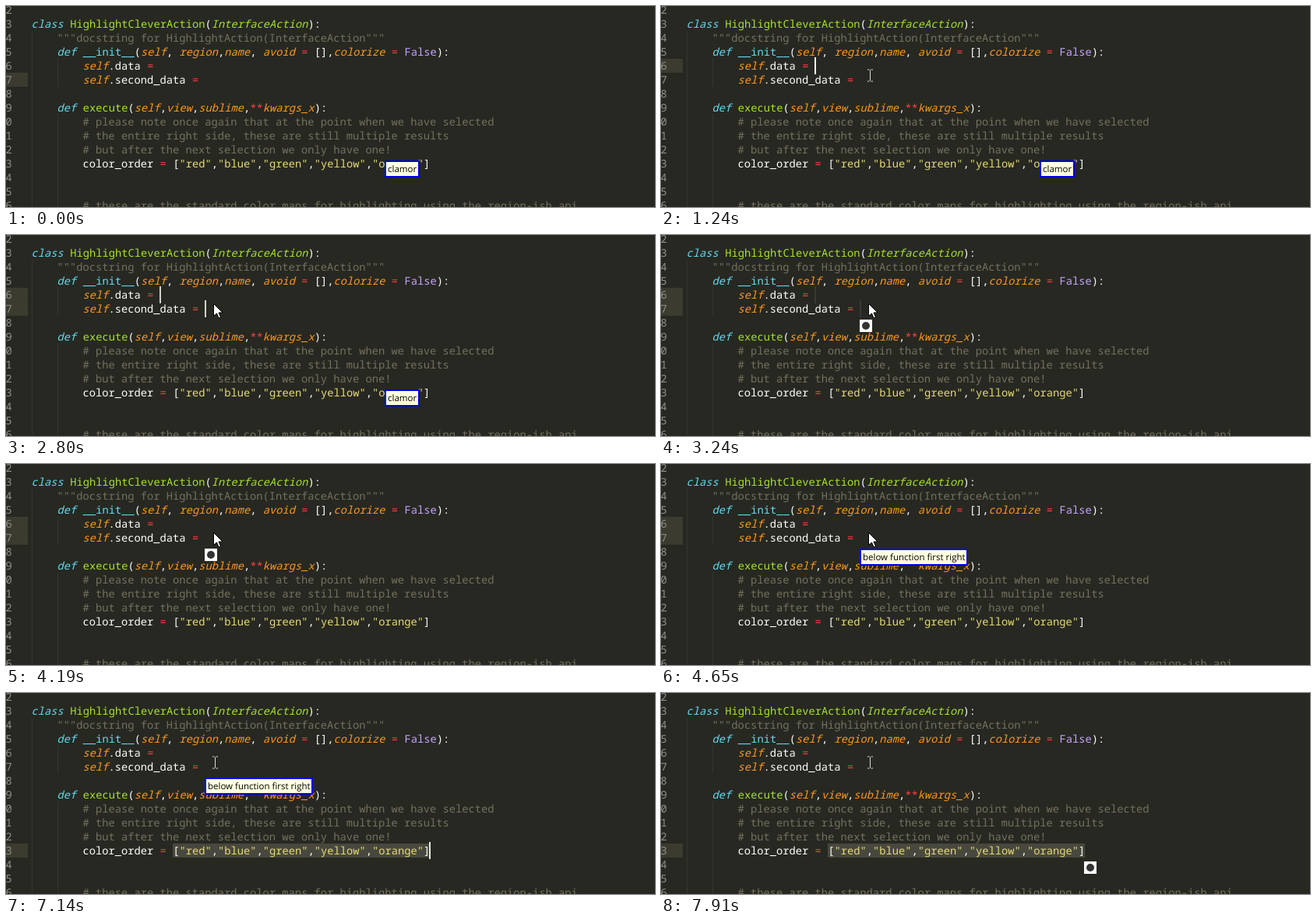
These frames come from a looping animation (833 px wide and 259 px high, 8 s). An HTML page:

```html
<!DOCTYPE html>
<html lang="en">
<head>
<meta charset="utf-8">
<title>Editor with multiple carets</title>
<style>
  html, body { margin: 0; width: 100%; height: 100%; overflow: hidden; background: #272822; }
  svg { display: block; }
  text { fill: #fff; text-rendering: geometricPrecision; }
  #code text, #nums text { font: 500 13.75px "Noto Sans Mono", "DejaVu Sans Mono", monospace; }
  #nums text { fill: #8f908a; }
  #code .k { fill: #66d9ef; }
  #code .n { fill: #a6e22e; }
  #code .a { fill: #fd971f; }
  #code .o { fill: #ff4040; }
  #code .v { fill: #c5a5ff; }
  #code .s { fill: #e6db74; }
  #code .c { fill: #75715e; font-weight: 400; }
  #code .i { font-style: italic; }
  #gutter { fill: #3c3b2f; }
  #guides { stroke: #42433b; stroke-dasharray: 1 1; }
  #carets { fill: #f8f8f0; }
  #tip text { fill: #000; font: 11.5px "Open Sans", "Noto Sans", sans-serif; }
</style>
</head>
<body>
<svg width="833" height="259" viewBox="0 0 833 259">
  <g id="gutter"></g>
  <path id="guides" d="M33.5 33V259M66.5 68V104M66.5 140V259"/>
  <rect id="selection" x="214" y="194" width="330" height="18" fill="#49483e"/>
  <g id="nums"></g>
  <g id="code" transform="translate(-0.4 0)">
    <text x="33" y="28"><tspan class="k i">class</tspan> <tspan class="n">HighlightCleverAction</tspan>(<tspan class="n i">InterfaceAction</tspan>):</text>
    <text x="66" y="46" class="c">"""docstring for HighlightAction(InterfaceAction"""</text>
    <text x="66" y="64"><tspan class="k i">def</tspan> <tspan class="k">__init__</tspan>(<tspan class="a i">self</tspan>, <tspan class="a i">region</tspan>,<tspan class="a i">name</tspan>, <tspan class="a i">avoid</tspan> <tspan class="o">=</tspan> [],<tspan class="a i">colorize</tspan> <tspan class="o">=</tspan> <tspan class="v">False</tspan>):</text>
    <text x="99" y="82"><tspan class="a i">self</tspan>.data <tspan class="o">=</tspan></text>
    <text x="99" y="100"><tspan class="a i">self</tspan>.second_data <tspan class="o">=</tspan></text>
    <text x="66" y="136"><tspan class="k i">def</tspan> <tspan class="n">execute</tspan>(<tspan class="a i">self</tspan>,<tspan class="a i">view</tspan>,<tspan class="a i">sublime</tspan>,<tspan class="o">**</tspan><tspan class="a i">kwargs_x</tspan>):</text>
    <text x="99" y="154" class="c"># please note once again that at the point when we have selected</text>
    <text x="99" y="172" class="c"># the entire right side, these are still multiple results</text>
    <text x="99" y="190" class="c"># but after the next selection we only have one!</text>
    <text x="99" y="208">color_order <tspan class="o">=</tspan> [<tspan class="s">"red"</tspan>,<tspan class="s">"blue"</tspan>,<tspan class="s">"green"</tspan>,<tspan class="s">"yellow"</tspan>,<tspan class="s">"orange"</tspan>]</text>
    <text x="99" y="262" class="c"># these are the standard color maps for highlighting using the region-ish api</text>
  </g>
  <g id="carets"></g>
  <g id="tip">
    <rect x="1" y="1" height="20" fill="#ffffe1" stroke="#0000e6" stroke-width="2"/>
    <text x="4" y="15"></text>
  </g>
  <g id="icon">
    <rect width="16" height="16" fill="#fff"/>
    <circle cx="8" cy="8" r="5" fill="#333"/>
  </g>
  <path id="beam" d="M-3.5 -7.5H-1M1 -7.5H3.5M0 -7V7M-3.5 7.5H-1M1 7.5H3.5" fill="none" stroke="#dddddf"/>
  <path id="arrow" transform="translate(266.5 88.5)" d="M0 0V16L4 12.5L6.5 18.5L9 17.5L6.5 11.5H11.5Z" fill="#fff" stroke="#000"/>
</svg>
<script>
const LOOP = 8000, CLICK = 850, ADD = 1480, SELECT = 4800;
const $ = id => document.getElementById(id);
const show = (el, on) => el.setAttribute("visibility", on ? "visible" : "hidden");
const place = (el, x, y) => el.setAttribute("transform", `translate(${x} ${y})`);
const clamp = v => Math.max(0, Math.min(1, v));
const rowTop = line => 14 + (line - 3) * 18;

function add(parent, tag, attrs) {
  const el = document.createElementNS("http://www.w3.org/2000/svg", tag);
  for (const key in attrs) el.setAttribute(key, attrs[key]);
  return parent.appendChild(el);
}

for (let line = 2; line <= 16; line++)
  add($("nums"), "text", { x: -0.5, y: rowTop(line) + 14 }).textContent = line % 10;

// One gutter mark and one caret for each line that gets edited
const spots = [[6, 197], [7, 255], [13, 543]].map(([line, x]) => ({
  line,
  mark: add($("gutter"), "rect", { x: 0, y: rowTop(line), width: 28, height: 18 }),
  caret: add($("carets"), "rect", { x, y: rowTop(line) - 2, width: 2, height: 22 })
}));

const blinks = [[CLICK, 2320], [2720, 3240], [3560, 4160], [SELECT, 5430], [5980, 6520], [7050, 7600]];

function caretAlpha(t) {
  if (t >= 3240 && t < 3560) return 0.08;
  const blink = blinks.find(([on, off]) => t >= on && t < off);
  return blink ? Math.min(clamp((t - blink[0]) / 100), clamp((blink[1] - t) / 230)) : 0;
}

function activeLines(t) {
  return t < CLICK ? [7] : t < ADD ? [6] : t < SELECT ? [6, 7] : [13];
}

const phrase = "below function first right";
const popups = [ // start, x, y, width, text (no text: icon)
  [0, 486, 199, 45, "clamor"],
  [2870, 255, 109],
  [4650, 255, 109, 139, phrase],
  [7220, 543, 217, 139, phrase],
  [7450, 543, 217]
];

function drawPopup(t) {
  const [, x, y, width, text] = popups.filter(p => p[0] <= t).pop();
  const tip = $("tip");
  show(tip, text);
  show($("icon"), !text);
  place(text ? tip : $("icon"), x, y);
  if (text) {
    tip.children[0].setAttribute("width", width - 2);
    tip.children[1].textContent = text;
  }
}

function drawPointer(t) {
  const ease = v => v * v * (3 - 2 * v);
  const a = ease(clamp((t - 70) / 630)), b = ease(clamp((t - CLICK) / 230));
  const arrow = t >= ADD && t < SELECT;
  show($("arrow"), arrow);
  show($("beam"), t >= 70 && !arrow);
  place($("beam"), Math.round(571 - 309 * a + 6 * b) + 0.5, Math.round(203 - 125 * a + 11 * b) + 0.5);
}

function draw(now) {
  const t = now % LOOP, lines = activeLines(t), alpha = caretAlpha(t);
  for (const { line, mark, caret } of spots) {
    const active = lines.includes(line);
    show(mark, active);
    caret.setAttribute("opacity", active ? alpha : 0);
  }
  show($("selection"), t >= SELECT);
  drawPopup(t);
  drawPointer(t);
}

const start = performance.now();
function tick() {
  draw(performance.now() - start);
  requestAnimationFrame(tick);
}
tick();
</script>
</body>
</html>
```
